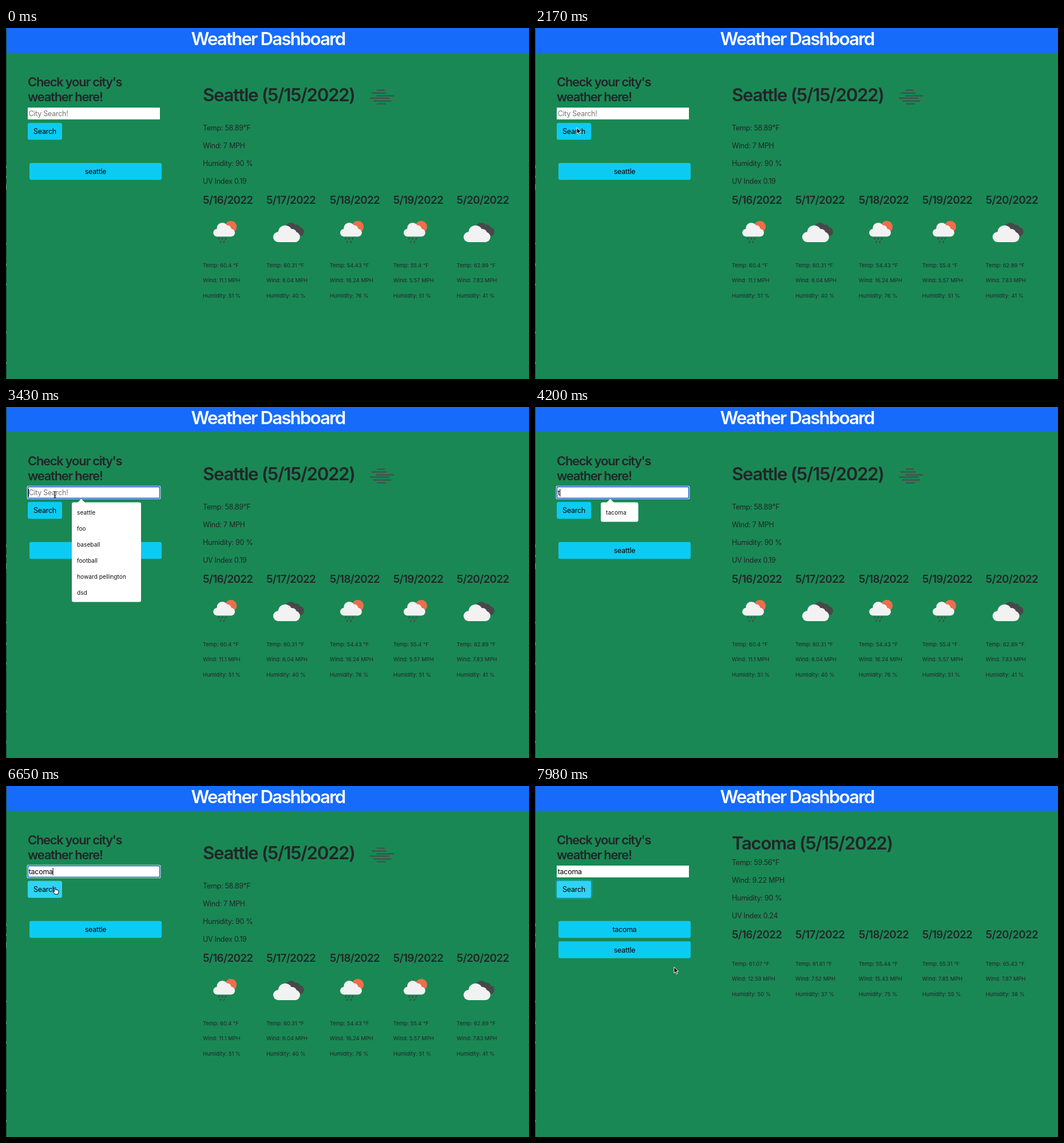
Animation of 914 by 613 pixels, one loop 8 s. Source, as an HTML page:

```html
<!DOCTYPE html>
<html lang="en">
<head>
<meta charset="utf-8">
<title>Weather Dashboard</title>
<style>
html, body { margin: 0; width: 100%; height: 100%; overflow: hidden; background: #1a8854; }
svg { display: block; font: 12.5px Inter, "Liberation Sans", sans-serif; letter-spacing: -.022em; fill: #212529; }
text { white-space: pre; }
.h1, .h3, .h4 { font-weight: 600; }
.h1 { font-size: 31.25px; letter-spacing: -.043em; }
.h3 { font-size: 21.9px; letter-spacing: -.056em; }
.h4 { font-size: 18.75px; letter-spacing: -.034em; }
.title { letter-spacing: -.06em; }
.small { font-size: 9.4px; letter-spacing: 0; }
.item { font-size: 10.2px; letter-spacing: 0; fill: #111; }
.btn { fill: #0ccbf3; }
.mid { text-anchor: middle; fill: #000; }
.light { fill: #f2f2f2; }
.dark { fill: #48484a; }
</style>
</head>
<body>
<svg id="stage" width="914" height="613" viewBox="0 0 914 613">
  <defs>
    <g id="rain">
      <circle cx="49" cy="11" r="10.3" fill="#ec6e4c"/>
      <g class="light">
        <circle cx="25" cy="21.500" r="6.800"/><circle cx="34" cy="13.500" r="9.500"/>
        <circle cx="43" cy="15" r="6.500"/><circle cx="49.300" cy="21.500" r="6.800"/>
        <rect x="25" y="14" width="24.500" height="14.300"/>
      </g>
      <path stroke="#48484a" stroke-width="2" stroke-linecap="round" d="M28.500 30.500l-1 2M34.500 31l-1 2M40.500 31l-1 2M31 36.500l-1 2M37.500 36.500l-1 2"/>
    </g>
    <g id="clouds">
      <g class="dark">
        <circle cx="43" cy="14" r="10"/><circle cx="53" cy="14" r="6.500"/><circle cx="58" cy="20" r="8"/>
        <rect x="43" y="14" width="15" height="14"/>
      </g>
      <g class="light">
        <circle cx="21" cy="29" r="9"/><circle cx="33" cy="21" r="12.300"/>
        <circle cx="45" cy="23" r="8"/><circle cx="50" cy="29" r="9"/>
        <rect x="21" y="24" width="29" height="14"/>
      </g>
    </g>
    <path id="arrow" fill="#000" stroke="#fff" stroke-width="1" d="M0 0V10.600L2.500 8.400 4.300 12.400 6 11.600 4.300 7.700H7.600Z"/>
    <path id="hand" fill="#fff" stroke="#000" stroke-width="1" stroke-linejoin="round" d="M-1.200 7V.5Q-.2-1 .8.500V4.200L2.600 4.400 4.500 4.900 6 5.600V8.500L4.800 12H-.7L-3.700 7.600Q-3.500 5.800-1.200 7.500Z"/>
    <path id="beam" fill="none" stroke="#111" stroke-width="1.200" d="M-2-5.500Q0-5.500 0-4Q0-5.500 2-5.500M0-4.500V4.500M-2 5.500Q0 5.500 0 4Q0 5.500 2 5.500M-1.500 2H1.500"/>
  </defs>
  <rect width="914" height="613" fill="#1a8854"/>
  <rect width="914" height="43.500" fill="#166bfb"/>
  <rect width="1" height="613" fill="#174832"/>
  <path stroke="#6d8a7c" d="M.5 240v5M.5 258v4M.5 273v10M.5 375v3M.5 411v5M.5 446v4M.5 530v4M.5 583v4"/>
  <text class="h1 title mid" x="458" y="30" style="fill:#fff">Weather Dashboard</text>
  <text class="h3" x="38" y="102">Check your city's</text>
  <text class="h3" x="38" y="128">weather here!</text>
  <rect x="38" y="139" width="231" height="20.600" fill="#fff"/>
  <g id="focus">
    <rect x="36.700" y="137.800" width="233.600" height="23.200" rx="2.500" fill="#fff"/>
    <rect x="38.400" y="139.400" width="230.200" height="20" rx="1" fill="none" stroke="#1a5fcb" stroke-width="1.600"/>
  </g>
  <text id="field" x="39.700" y="154"></text>
  <rect id="caret" y="143" width="1" height="13.500" fill="#000"/>
  <rect id="ring" x="35.500" y="163" width="65" height="35" rx="5" fill="#0bacc4" opacity=".5"/>
  <rect id="search" class="btn" x="38" y="165.700" width="60" height="29.500" rx="3"/>
  <text class="mid" x="68" y="185">Search</text>
  <g id="history"></g>
  <g id="seattle"></g>
  <g id="tacoma"></g>
  <g id="popup">
    <path fill="#fff" d="M124.500 167.500L131.500 160.500 138.500 167.500Z"/>
    <rect id="sheet" x="115" y="166.500" rx="3" fill="#fff"/>
    <g id="items"></g>
  </g>
  <use id="pointer"/>
</svg>
<script>
const LOOP = 8000, STEP = 70;
const CLICK_FIELD = 3010, OPEN = 3080, CLICK_SEARCH = 7140, RESULT = 7280;
const typed = [[4060, "t"], [4550, "ta"], [4760, "tac"], [5040, "taco"], [5250, "tacom"], [5460, "tacoma"]];
const recent = ["seattle", "foo", "baseball", "football", "howard pellington", "dsd"];

// time, x, y, pointer shape from here on
const path = [
  [350, 110, 613, "arrow"], [770, 178, 270, "arrow"], [1120, 238, 58, "arrow"], [1330, 244, 36, "arrow"],
  [1540, 236, 46, "arrow"], [1960, 128, 140, "arrow"], [2170, 73, 174, "arrow"], [2240, 74, 175, "hand"],
  [2450, 88, 162, "beam"], [2520, 88.5, 148, "beam"], [2590, 88.5, 148, "beam"], [2730, 85.5, 153, "beam"],
  [4060, 85.5, 153, ""], [6300, 85.5, 153, "beam"], [6440, 86, 164, "hand"], [6580, 86, 177, "hand"],
  [7280, 86, 177, "hand"], [7350, 108, 202, "arrow"], [7630, 243, 316, "arrow"], [LOOP, 243, 316, "arrow"]
];

const $ = id => document.getElementById(id);
const label = (x, y, s, cls = "") => `<text class="${cls}" x="${x}" y="${y}">${s}</text>`;
const show = (id, on) => $(id).style.display = on ? "" : "none";

function report(id, city, now, days, top, titleY, icons) {
  const names = ["Temp", "Wind", "Humidity"], units = [" °F", " MPH", " %"];
  let out = label(344, titleY, `${city} (5/15/2022)`, "h1");
  now.forEach((s, i) => out += label(344, top + i * 31.1, s));
  const dayY = top + 128, rowY = dayY + (icons ? 110.5 : 47.5);
  days.forEach((day, i) => {
    const x = 344 + i * 110.9;
    out += label(x, dayY, `5/${16 + i}/2022`, "h4");
    if (icons) out += `<use href="#${i % 3 == 1 ? "clouds" : "rain"}" x="${x}" y="336"/>`;
    day.forEach((v, j) => out += label(x, rowY + j * 26.6, `${names[j]}: ${v}${units[j]}`, "small"));
  });
  if (icons) out += `<path stroke="#48484a" stroke-width="1.800" d="M648 108.500h14M639 113.500h26M647 118.500h31M636 122.500h34M642 127.500h31M648 132.500h16"/>`;
  $(id).innerHTML = out;
}

report("seattle", "Seattle", ["Temp: 58.89°F", "Wind: 7 MPH", "Humidity: 90 %", "UV Index 0.19"],
  [[60.4, 11.1, 51], [60.31, 6.04, 40], [54.43, 16.24, 76], [55.4, 5.57, 51], [62.89, 7.83, 41]], 179, 128, true);
report("tacoma", "Tacoma", ["Temp: 59.56°F", "Wind: 9.22 MPH", "Humidity: 90 %", "UV Index 0.24"],
  [[61.07, 12.59, 50], [61.61, 7.52, 37], [55.44, 15.43, 75], [55.31, 7.85, 55], [65.43, 7.87, 38]], 138, 111, false);

function fill(id, key, make) {
  const el = $(id);
  if (el.dataset.key === key) return;
  el.dataset.key = key;
  el.innerHTML = make();
}

function movePointer(t) {
  const i = path.findLastIndex(p => p[0] <= t);
  const kind = i < 0 ? "" : path[i][3];
  show("pointer", kind);
  if (!kind) return kind;
  const [t0, x0, y0] = path[i], [t1, x1, y1] = path[i + 1];
  const k = (t - t0) / (t1 - t0);
  $("pointer").setAttribute("href", "#" + kind);
  $("pointer").setAttribute("transform", `translate(${x0 + (x1 - x0) * k} ${y0 + (y1 - y0) * k})`);
  return kind;
}

function draw(time) {
  const t = Math.floor(time / STEP) * STEP;
  const word = (typed.findLast(p => p[0] <= t) || [0, ""])[1];
  const focused = t >= CLICK_FIELD && t < CLICK_SEARCH;
  const done = t >= CLICK_SEARCH;

  show("focus", focused);
  $("field").textContent = word || "City Search!";
  $("field").style.fill = word ? "#000" : "#757575";
  const last = t < 4060 ? CLICK_FIELD : Math.max(4060, Math.min(t, 5460));
  show("caret", focused && Math.floor((t - last) / 530) % 2 == 0);
  $("caret").setAttribute("x", word ? 39.5 + $("field").getComputedTextLength() : 39);

  const list = word ? ["tacoma"] : recent;
  show("popup", t >= OPEN && t < 5460);
  $("sheet").setAttribute("width", word ? 65.5 : 121);
  $("sheet").setAttribute("height", list.length * 28 + 6);
  fill("items", list.join(), () => list.map((s, i) => label(124, 187.5 + i * 28, s, "item")).join(""));

  const cities = done ? ["tacoma", "seattle"] : ["seattle"];
  fill("history", cities.join(), () => cities.map((s, i) =>
    `<rect class="btn" x="41" y="${235.8 + i * 35.5}" width="231" height="29.500" rx="3"/>` +
    label(156.5, 255 + i * 35.5, s, "mid")).join(""));

  show("seattle", t < RESULT);
  show("tacoma", t >= RESULT);
  show("ring", done);
  const kind = movePointer(t);
  $("search").style.fill = done || kind == "hand" ? "#30d3f4" : "";
}

const start = performance.now();
function tick() {
  draw((performance.now() - start) % LOOP);
  requestAnimationFrame(tick);
}
tick();
</script>
</body>
</html>
```
